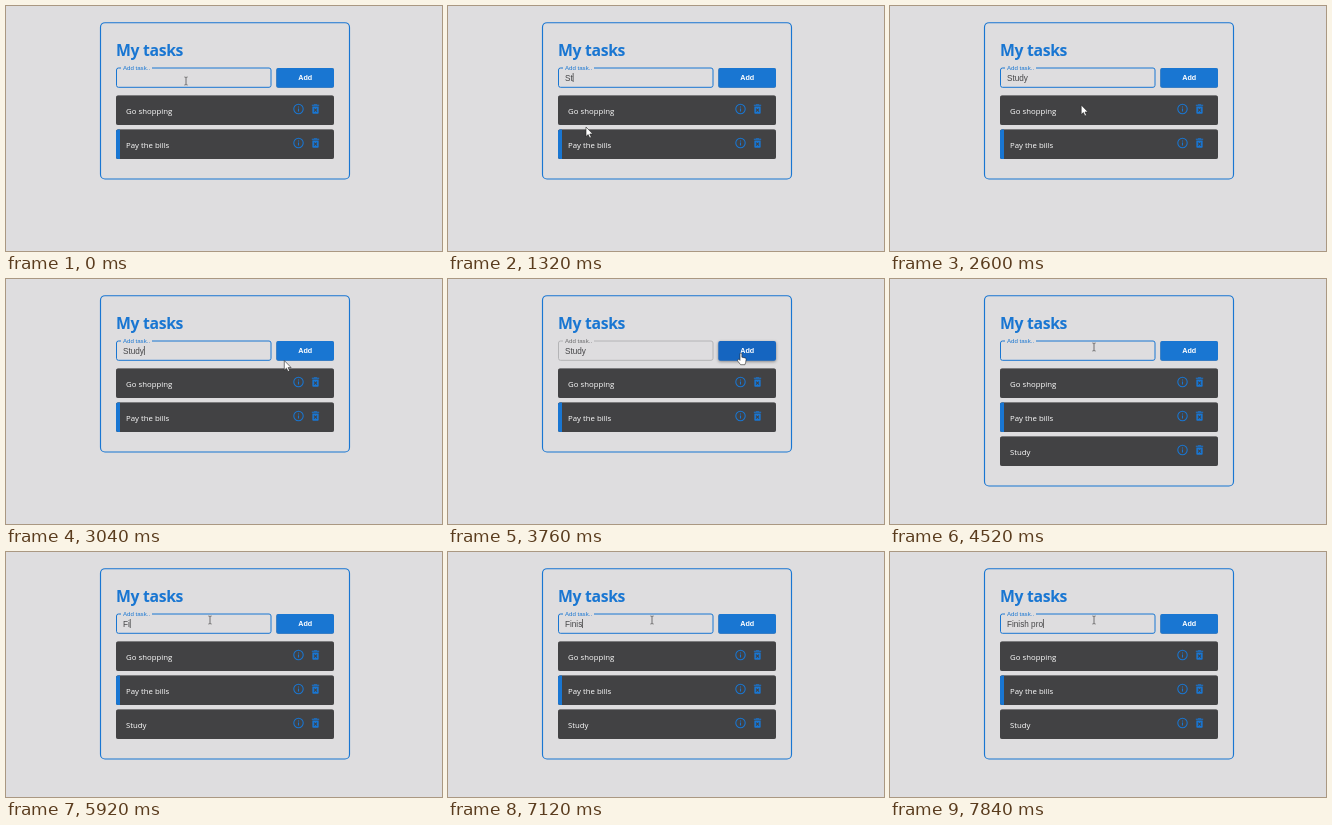
These frames come from a looping animation (436 by 245 pixels, 8000 ms). An HTML page:

```html
<!DOCTYPE html>
<html lang="en">
<head>
<meta charset="utf-8">
<title>My tasks</title>
<style>
  html, body { margin: 0; width: 100%; height: 100%; overflow: hidden; background: #dedddf; }
  svg { display: block; width: 436px; height: 245px; }
  text { white-space: pre; }
  .blue { fill: #1976d2; }
  .line { fill: none; stroke: #1976d2; }
  .title { font: 700 15.8px "Open Sans", "Noto Sans", sans-serif; letter-spacing: -.35px; }
  .name { font: 7.8px "Open Sans", "Noto Sans", sans-serif; fill: #fff; }
  .ui { font-family: "Liberation Sans", Arial, sans-serif; }
  .card { fill: #424244; filter: drop-shadow(0 .5px .6px rgba(0, 0, 0, .35)); }
  #label { font-size: 6.1px; fill: #1976d2; }
  #typed { font-size: 8.2px; fill: #454547; }
  #add { font-size: 7.2px; font-weight: 700; fill: #fff; text-anchor: middle; }
  .blurred #label { fill: #6b6b6d; }
  .blurred #outline { stroke: #b4b4b6; }
  .pointer { fill: #fff; stroke: #222; stroke-width: .6; stroke-linejoin: round; }
  #beam { fill: none; stroke: #555; stroke-width: .8; }
</style>
</head>
<body>
<svg viewBox="0 0 436 245">
  <defs>
    <g id="icons">
      <circle class="line" cx="292.5" cy="13.5" r="4.7" stroke-width="1.05"/>
      <path class="line" d="M292.5 12.9v3.2M292.5 10.9v1.1" stroke-width="1.05"/>
      <path class="blue" transform="translate(303.2 7.2) scale(.525)" d="M6 19c0 1.1.9 2 2 2h8c1.1 0 2-.9 2-2V7H6v12zm2.46-7.12l1.41-1.41L12 12.59l2.12-2.12 1.41 1.41L13.41 14l2.12 2.12-1.41 1.41L12 15.41l-2.12 2.12-1.41-1.41L10.59 14l-2.13-2.12zM15.5 4l-1-1h-5l-1 1H5v2h14V4z"/>
    </g>
  </defs>

  <rect id="panel" class="line" x="94.5" y="16.7" width="249" height="156" rx="4.5" stroke-width="1.15"/>
  <text class="title blue" x="110" y="50">My tasks</text>

  <g id="field">
    <path id="outline" class="line" d="M146 62H263a2 2 0 0 1 2 2V79.3a2 2 0 0 1-2 2H112.5a2 2 0 0 1-2-2V64a2 2 0 0 1 2-2H115"/>
    <text id="label" class="ui" x="117" y="63.6">Add task..</text>
    <text id="typed" class="ui" x="117" y="74.7"></text>
    <rect id="caret" y="67" width=".7" height="9" fill="#333"/>
  </g>

  <rect id="button" x="270.3" y="62" width="57.7" height="19.7" rx="2"/>
  <text id="add" class="ui" x="299.2" y="74.4">Add</text>

  <g id="list"></g>

  <path id="arrow" class="pointer" d="M0 0V9.6L2.2 7.6 3.7 11 5.3 10.3 3.8 7H6.8Z"/>
  <path id="hand" class="pointer" d="M-1 .9C-1-.3.9-.3.9.9V4.2l3 .7c1 .2 1.3.8 1.2 1.7L4.6 9.8 3.9 11.7H-.4L-3 8.4c-.7-1-.4-1.8.2-2 .7-.2 1.3.3 1.8.9z"/>
  <path id="beam" d="M-1.6-4Q0-4 0-3.2Q0-4 1.6-4M0-3.2V3.2M-1.6 4Q0 4 0 3.2Q0 4 1.6 4"/>
</svg>

<script>
const LOOP = 8000, PRESS = 3720, CLICK = 3880, BLINK = 520;
const $ = id => document.getElementById(id);

// Times at which each character appears
const entries = [
  { text: "Study", keys: [880, 1320, 1440, 1520, 1640] },
  { text: "Finish pro", keys: [5720, 5920, 6120, 6240, 7120, 7200, 7440, 7600, 7720, 7840] }
];

// Pointer path: time, x, y
const path = [
  [0, 180, 75], [40, 180, 75], [200, 138, 121], [2120, 138, 121], [2200, 157, 113],
  [2320, 157, 113], [2600, 191, 99], [3080, 286, 80], [3160, 298, 76], [3440, 293, 74],
  [3860, 293, 74], [4000, 262, 73], [4200, 222, 42], [4520, 204, 68], [LOOP, 204, 68]
];

const clamp = v => Math.min(1, Math.max(0, v));
const ease = v => v * v * (3 - 2 * v);
const ramp = (t, start, length) => ease(clamp((t - start) / length));
const show = (el, on) => el.setAttribute("visibility", on ? "visible" : "hidden");

const rows = ["Go shopping", "Pay the bills", "Study"].map((name, i) => {
  const row = document.createElementNS("http://www.w3.org/2000/svg", "g");
  row.setAttribute("transform", `translate(0 ${89.5 + 34 * i})`);
  row.innerHTML = `<rect class="card" x="110" width="218" height="29.5" rx="2"/>
    ${i === 1 ? '<path class="blue" d="M114 0H112a2 2 0 0 0-2 2V27.5a2 2 0 0 0 2 2H114Z"/>' : ""}
    <text class="name" x="120" y="18.4">${name}</text><use href="#icons"/>`;
  $("list").append(row);
  return row;
});

function pointerAt(t) {
  const i = path.findIndex(p => p[0] > t);
  const [t0, x0, y0] = path[i - 1], [t1, x1, y1] = path[i];
  const k = (t - t0) / (t1 - t0);
  return [x0 + (x1 - x0) * k, y0 + (y1 - y0) * k];
}

function drawPointer(t) {
  const [x, y] = pointerAt(t);
  const inField = x > 110 && x < 266 && y > 61 && y < 82;
  const kind = t >= 3080 && t < 4030 ? "hand" : inField ? "beam" : "arrow";
  for (const id of ["arrow", "hand", "beam"]) show($(id), id === kind);
  $(kind).setAttribute("transform", `translate(${x} ${y})`);
}

function drawField(t) {
  const { text, keys } = entries[t < CLICK ? 0 : 1];
  const count = keys.filter(k => k <= t).length;
  const blurred = t >= PRESS && t < CLICK;
  const typed = $("typed");
  typed.textContent = text.slice(0, count);
  $("field").classList.toggle("blurred", blurred);

  // The blink restarts with every key
  const since = t - (count ? keys[count - 1] : t < CLICK ? 160 : CLICK - 30);
  const lit = since >= 0 && Math.floor(since / BLINK) % 2 === 0;
  show($("caret"), lit && !blurred);
  $("caret").setAttribute("x", 117 + (count ? typed.getComputedTextLength() : 0));
}

function drawButton(t) {
  const k = ramp(t, 3080, 250) - ramp(t, 3960, 250);
  const mix = (a, b) => Math.round(a + (b - a) * k);
  $("button").style.fill = `rgb(${mix(25, 21)}, ${mix(118, 101)}, ${mix(210, 192)})`;
  $("button").style.filter = `drop-shadow(0 ${.7 + .6 * k}px ${.7 + .7 * k}px rgba(0, 0, 0, .4))`;
}

function draw(t) {
  const added = t >= CLICK;
  show(rows[2], added);
  $("panel").setAttribute("height", added ? 190.3 : 156.3);
  drawField(t);
  drawButton(t);
  drawPointer(t);
}

const start = performance.now();
function tick() {
  draw((performance.now() - start) % LOOP);
  requestAnimationFrame(tick);
}
tick();
</script>
</body>
</html>
```
